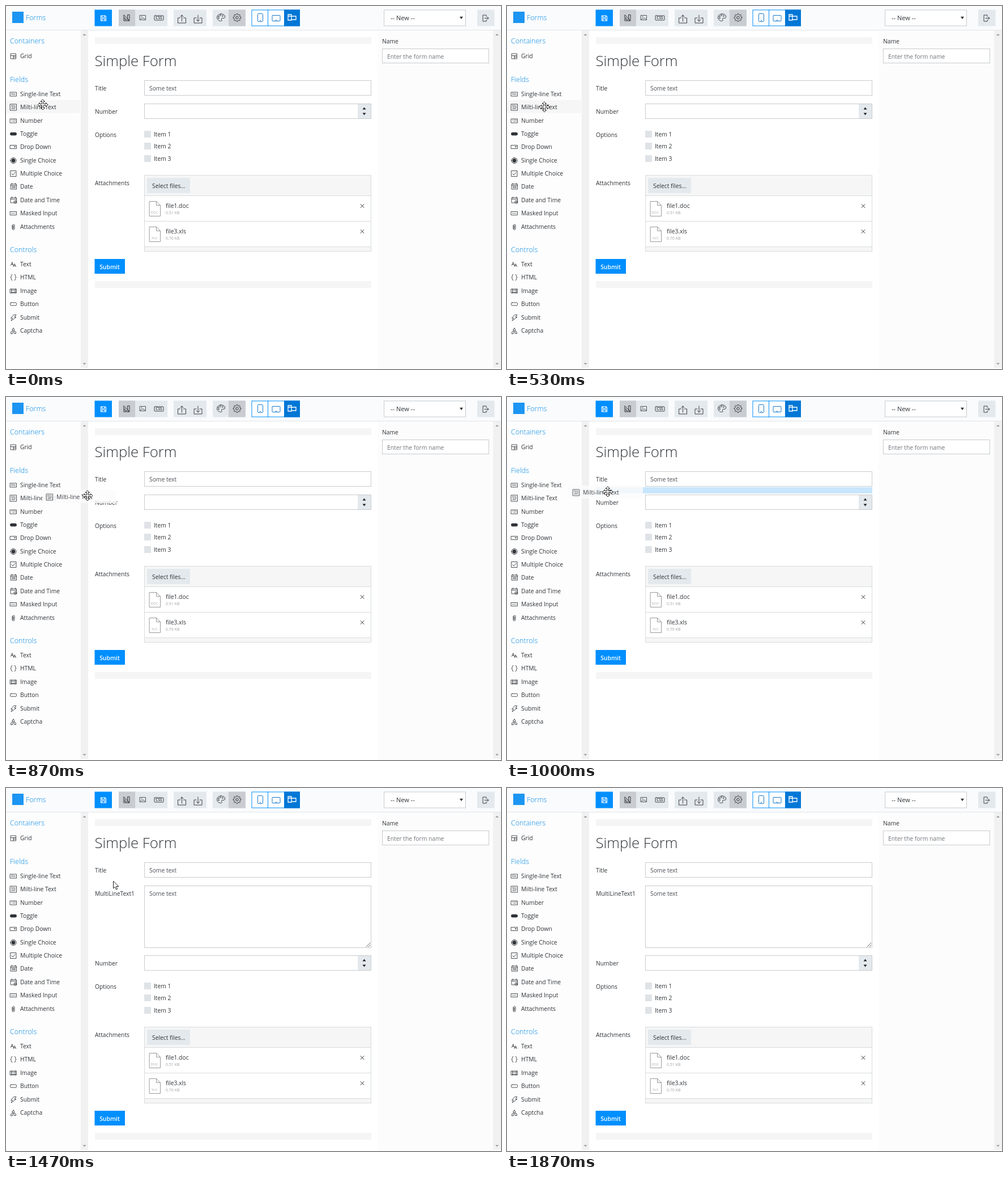
Recreate the animation shown at these times as an HTML page with a canvas. Size 874 px wide and 640 px high, loop 2670 ms.

```html
<!DOCTYPE html>
<html lang="en">
<head>
<meta charset="utf-8">
<title>Form designer</title>
<style>
html, body { margin: 0; width: 100%; height: 100%; overflow: hidden; background: #fff; }
canvas { display: block; width: 874px; height: 640px; }
</style>
</head>
<body>
<canvas id="stage" width="874" height="640"></canvas>
<script>
const g = document.getElementById('stage').getContext('2d');
const FONT = '"Open Sans", "Noto Sans", sans-serif';
const LOOP = 2670, STEP = 200 / 3, GROW = 123;
const DRAG = 600, HINT = 930, DROP = 1470, GONE = 1870;
const BLUE = '#008fff', HEAD = '#0088e4', INK = '#2f3338', SOFT = '#4b4f55';
const BTN = '#e4e9ee', ON = '#c9cdd2', LINE = '#c8cbce', PALE = '#d8dadc';

function rect(x, y, w, h, color) {
  g.fillStyle = color;
  g.fillRect(x, y, w, h);
}

function frame(x, y, w, h, line = LINE, fill = '#fff') {
  rect(x, y, w, h, line);
  rect(x + 1, y + 1, w - 2, h - 2, fill);
}

// y is the middle of the text line
function text(s, x, y, color = INK, size = 10.3, weight = 400, align = 'left') {
  g.font = `${weight} ${size}px ${FONT}`;
  g.textAlign = align;
  g.fillStyle = color;
  g.fillText(s, x, y + size * 0.35);
}

const heading = (s, x, y) => text(s, x, y, HEAD, 12.5, 300);

function icon(x, y, d, { line = INK, fill, width = 1 } = {}) {
  const p = new Path2D(d);
  g.save();
  g.translate(x, y);
  g.lineCap = 'round';
  if (fill) { g.fillStyle = fill; g.fill(p); }
  if (line) { g.strokeStyle = line; g.lineWidth = width; g.stroke(p); }
  g.restore();
}

const solid = (x, y, d, fill) => icon(x, y, d, { line: null, fill });
const disc = r => `M${-r} 0A${r} ${r} 0 1 1 ${r} 0A${r} ${r} 0 1 1 ${-r} 0Z`;
const box = (w, h) => `M${-w / 2} ${-h / 2}h${w}v${h}h${-w}Z`;
const tri = (x, y, w, h, color) => solid(x, y, `M${-w} ${-h / 2}H${w}L0 ${h / 2}Z`, color);

const CALENDAR = 'M-4.5-4.5h10v9h-10Z M-4.5-2h10 M-2.5-6v2 M3.5-6v2';
const DAYS = 'M-2.5 0h6 M-2.5 2h6';

// label, path, tiny text lines, line width, filled part
const FIELDS = [
  ['Single-line Text', box(11, 7), ['Abc']],
  ['Milti-line Text', box(11, 11), ['Abc', 'def']],
  ['Number', box(11, 7), ['123']],
  ['Toggle', 'M-3.2 0H3.2', null, 5.4],
  ['Drop Down', box(11, 6) + 'M1.5-.8h2.4L2.7 .6Z'],
  ['Single Choice', disc(5), null, 1, disc(3.4)],
  ['Multiple Choice', box(10, 10) + 'M-3 0L-1 2.5L3.5-2.5'],
  ['Date', CALENDAR + DAYS],
  ['Date and Time', CALENDAR + 'M1 3a2.5 2.5 0 1 0 5 0a2.5 2.5 0 1 0-5 0M3.5 1.5v1.7h1.4'],
  ['Masked Input', box(11, 6) + 'M-3.2 0h1M-.5 0h1M2.2 0h1'],
  ['Attachments', 'M-2-3v6a2 2 0 0 0 4 0v-6a1.5 1.5 0 0 0-3 0v5.5a.6 .6 0 0 0 1.2 0v-4.5']
];
const CONTROLS = [
  ['Text', 'M-4.5 2L-2.2-4L0 2M-3.6 0h2.8M0 4L2.2-1L4.5 4M.8 2.4h2.8'],
  ['HTML', 'M-2-5q-1.7 0-1.7 1.7v1.5q0 1.8-1.5 1.8q1.5 0 1.5 1.8v1.5q0 1.7 1.7 1.7M2-5q1.7 0 1.7 1.7v1.5q0 1.8 1.5 1.8q-1.5 0-1.5 1.8v1.5q0 1.7-1.7 1.7'],
  ['Image', 'M-5.5-3.5h11v7h-11ZM-3.5-3.5v7M3.5-3.5v7M-3.5-1.5h7M-3.5 2h7'],
  ['Button', 'M-4-2.5h8q1.5 0 1.5 1.5v2q0 1.5-1.5 1.5h-8q-1.5 0-1.5-1.5v-2q0-1.5 1.5-1.5Z'],
  ['Submit', 'M1-5H5L2-1H5L-4 5.5L-1.5 .8H-4Z'],
  ['Captcha', 'M-4.5 5V3.5Q-4.5 1-2 1H2Q4.5 1 4.5 3.5V5H2V3.5h-4V5ZM-2-1.5a2 2 0 1 0 4 0a2 2 0 1 0-4 0M0-3.5v-1.5']
];

function item([label, path, tiny, width = 0.85, dot], x, y) {
  icon(x + 13, y + 0.5, path, { width });
  if (dot) solid(x + 13, y + 0.5, dot, INK);
  if (tiny) tiny.forEach((s, i) =>
    text(s, x + 13, y + 0.5 + (i - (tiny.length - 1) / 2) * 4.6, INK, 4.8, 400, 'center'));
  text(label, x + 25, y);
}

function scrollbar(x, w) {
  rect(x, 43, w, 595, '#f1f1f1');
  tri(x + w / 2, 50.5, 3, -3, '#999');
  tri(x + w / 2, 631, 3, 3, '#999');
}

function gear(x, y) {
  let d = '';
  for (let i = 0; i < 32; i++) {
    const a = (i - 0.5) * Math.PI / 16, r = i % 4 < 2 ? 7 : 5.3;
    d += `${i ? 'L' : 'M'}${r * Math.cos(a)} ${r * Math.sin(a)}`;
  }
  icon(x, y, d + 'Z' + disc(2.3), { width: 0.9 });
}

function header() {
  rect(0, 0, 874, 42, '#fafbfd');
  rect(0, 42, 874, 1, '#e2e4e6');
  rect(11, 10, 20, 20, '#1c95f3');
  heading('Forms', 35, 20.5);

  rect(156.5, 6.5, 30.5, 29, BLUE);
  icon(172, 21.5, 'M-4.5-4.5h7.5l1.5 1.5v7.5h-9ZM-2.5-4v3h4.5v-3M-2.5 4v-3h5v3', { line: '#fff', width: 1.2 });

  rect(199, 6.5, 86, 29, BTN);
  rect(199, 6.5, 29, 29, ON);
  icon(213, 21, 'M-5-5V5H5ZM-3-.5V3H.5M2-5.5h3v8l-1.5 2.5l-1.5-2.5Z');
  icon(241.5, 20.5, 'M-5-4h10v8h-10ZM-4 3L-1.5 0L0 1.5L1.5 .5L4 3M-2.5-2h1.2', { width: 0.8 });
  icon(270, 21, 'M-7-4h14q1 0 1 1v6q0 1-1 1h-14q-1 0-1-1v-6q0-1 1-1Z', { width: 0.9 });
  text('CSS', 270, 21, INK, 6.6, 600, 'center');

  rect(296, 6.5, 58, 29, BTN);
  const tray = 'M-3-1h-4v9h14v-9h-4M0 5V-6';
  icon(310.5, 22, tray + 'M-3-3L0-6L3-3', { width: 0.9 });
  icon(339, 22, tray + 'M-3 2L0 5L3 2', { width: 0.9 });

  rect(365, 6.5, 58, 29, BTN);
  rect(393, 6.5, 30, 29, ON);
  icon(379.5, 20.5, 'M0-6.5C9-6.5 9 2 3 1C0 .5 1 3 1.5 4.5C2 6-1 6.5-3 5.5C-10 2-7-6.5 0-6.5Z');
  for (const [x, y] of [[-4, 1], [-4, -2], [-1, -4], [3, -3]])
    icon(379.5 + x, 20.5 + y, disc(1), { width: 0.8 });
  gear(408, 20.5);

  frame(433.5, 6.5, 85.5, 29, BLUE);
  rect(462, 6.5, 1, 29, BLUE);
  rect(491, 6.5, 28, 29, '#0077d6');
  icon(449, 20.5, 'M-3.5-7h7q1 0 1 1v12q0 1-1 1h-7q-1 0-1-1v-12q0-1 1-1ZM-1 5h2', { line: '#1678c8' });
  icon(477, 21.5, 'M-6-5h12q1 0 1 1v8q0 1-1 1h-12q-1 0-1-1v-8q0-1 1-1ZM-1 3.5h2', { line: '#1678c8' });
  icon(505, 20.5, 'M-7-5.5h6v10h-6ZM-1-2.5h8v6h-8M-7-2.5h6', { line: '#fff', width: 1.3 });

  frame(667, 6.5, 145, 29);
  text('-- New --', 679, 21.5, INK, 11);
  tri(804, 21, 3, 4.5, '#333');
  rect(832, 6.5, 30.5, 29, BTN);
  icon(847, 21.5, 'M1-3v-2.5h-6v11h6v-2.5M-2 0H5M2.5-2.5L5 0L2.5 2.5', { width: 0.9 });
}

function sidebar(hover) {
  rect(0, 43, 132, 597, '#fdfdfd');
  if (hover) rect(0, 166, 131, 23, '#f6f6f6');
  heading('Containers', 7, 62);
  item(['Grid', 'M-4.5-4.5h9v9h-9ZM-4.5-1h9M0-1v5.5M0 1.5h4.5'], 0, 88);
  heading('Fields', 7, 130);
  FIELDS.forEach((f, i) => item(f, 0, Math.round(155 + i * 23.35)));
  heading('Controls', 7, 430);
  CONTROLS.forEach((c, i) => item(c, 0, Math.round(455 + i * 23.4)));
  scrollbar(132, 13);
}

function settings() {
  rect(656, 43, 204, 597, '#fcfcfc');
  text('Name', 664, 62);
  frame(664, 75, 189, 26);
  text('Enter the form name', 673, 89, '#70747a');
  scrollbar(860, 14);
}

function attached(name, type, size, y) {
  frame(244, y, 401, 46, PALE);
  icon(263, y + 23.5, 'M-9.5-13h12l7 7v19h-19ZM2.5-13v7h7', { line: '#999' });
  text(type, 262, y + 30, '#aaa', 6, 400, 'center');
  text(name, 282, y + 18);
  text(size, 282, y + 30.5, '#a0a0a0', 7);
  icon(629, y + 18.5, 'M-3-3L3 3M3-3L-3 3');
}

function form(dropped) {
  rect(157, 55, 488, 12, '#f5f5f5');
  text('Simple Form', 156.5, 97.5, '#33373c', 25.7, 300);
  text('Title', 157, 145);
  frame(244, 131, 401, 27);
  text('Some text', 253, 145, SOFT);
  if (dropped) {
    text('MultiLineText1', 157, 186);
    frame(244, 172, 401, 110);
    text('Some text', 253, 186, SOFT);
    icon(643, 280, 'M-7 0L0-7M-3 0L0-3', { line: '#666' });
  }

  g.save();
  if (dropped) g.translate(0, GROW);
  text('Number', 157, 186);
  frame(244, 172, 401, 27);
  rect(621, 173, 23, 25, BTN);
  tri(632.5, 180.5, 3, -4, '#222');
  tri(632.5, 190.5, 3, 4, '#222');

  text('Options', 157, 227);
  for (let i = 0; i < 3; i++) {
    const y = Math.round(226 + i * 21.4);
    rect(244, y - 6, 12, 12, '#dfe3e7');
    text('Item ' + (i + 1), 261, y + 0.5);
  }

  text('Attachments', 157, 312);
  frame(244, 298, 401, 135, PALE, '#f6f6f6');
  rect(249, 303, 76, 27, BTN);
  text('Select files...', 258, 317.5);
  attached('file1.doc', 'DOC', '0.51 KB', 334);
  attached('file3.xls', 'XLS', '0.70 KB', 379);

  rect(156.5, 446, 53.5, 26, BLUE);
  text('Submit', 183, 460, '#fff', 10.4, 600, 'center');
  rect(157, 485, 488, 12, '#f5f5f5');
  g.restore();
}

// [time, x, y]
const POINTER = [[0, 65, 174], [330, 66, 178], [530, 66, 178], [600, 71, 179],
  [870, 144, 174], [1000, 178, 167], [1200, 189, 164], [1470, 189, 164],
  [1600, 194, 260], [1800, 212, 606], [1870, 214, 650]];
const GHOST = [[600, 2, 179], [870, 64, 176], [1000, 109, 168], [1200, 124, 165]];

function along(keys, t) {
  let i = 0;
  while (i < keys.length - 2 && keys[i + 1][0] <= t) i++;
  const [a, b] = [keys[i], keys[i + 1]];
  const k = Math.max(0, Math.min(1, (t - a[0]) / (b[0] - a[0])));
  return [1, 2].map(n => Math.round(a[n] + (b[n] - a[n]) * k));
}

function ghost(t) {
  const [x, y] = along(GHOST, t);
  g.globalAlpha = 0.82;
  rect(x, y - 12, 131, 23, '#fcfcfc');
  g.globalAlpha = 0.92;
  item(FIELDS[1], x, y);
  g.globalAlpha = 1;
}

const CURSOR = { line: '#222', fill: '#fff' };

function moveCursor(x, y) {
  let d = '';
  const arm = [[0, -9], [3.5, -5.5], [1.3, -5.5], [1.3, -1.3], [5.5, -1.3], [5.5, -3.5]];
  for (let q = 0; q < 4; q++)
    for (let [u, v] of arm) {
      for (let n = 0; n < q; n++) [u, v] = [-v, u];
      d += `${d ? 'L' : 'M'}${u} ${v}`;
    }
  icon(x, y, d + 'Z', CURSOR);
}

function arrowCursor(x, y) {
  icon(x + 0.5, y + 0.5, 'M0 0V12.5L3 9.8L5 14.5L7.2 13.5L5.2 9H9Z', CURSOR);
}

function draw(t) {
  const dropped = t >= DROP, dragging = t >= DRAG && !dropped;
  rect(0, 0, 874, 640, '#fff');
  header();
  sidebar(t < DRAG);
  settings();
  form(dropped);
  if (dragging && t >= HINT) rect(157, 159, 488, 11, '#c8e6fd');
  if (dragging) ghost(t);
  if (t < GONE) (dropped ? arrowCursor : moveCursor)(...along(POINTER, t));
}

// the picture advances fifteen times a second, on a 10 ms clock
const stamp = k => Math.round(k * STEP / 10) * 10;
function snap(t) {
  let k = Math.ceil(t / STEP);
  while (stamp(k) > t) k--;
  return stamp(k);
}

const start = performance.now();
function tick() {
  draw(snap((performance.now() - start) % LOOP));
  requestAnimationFrame(tick);
}
tick();
</script>
</body>
</html>
```
